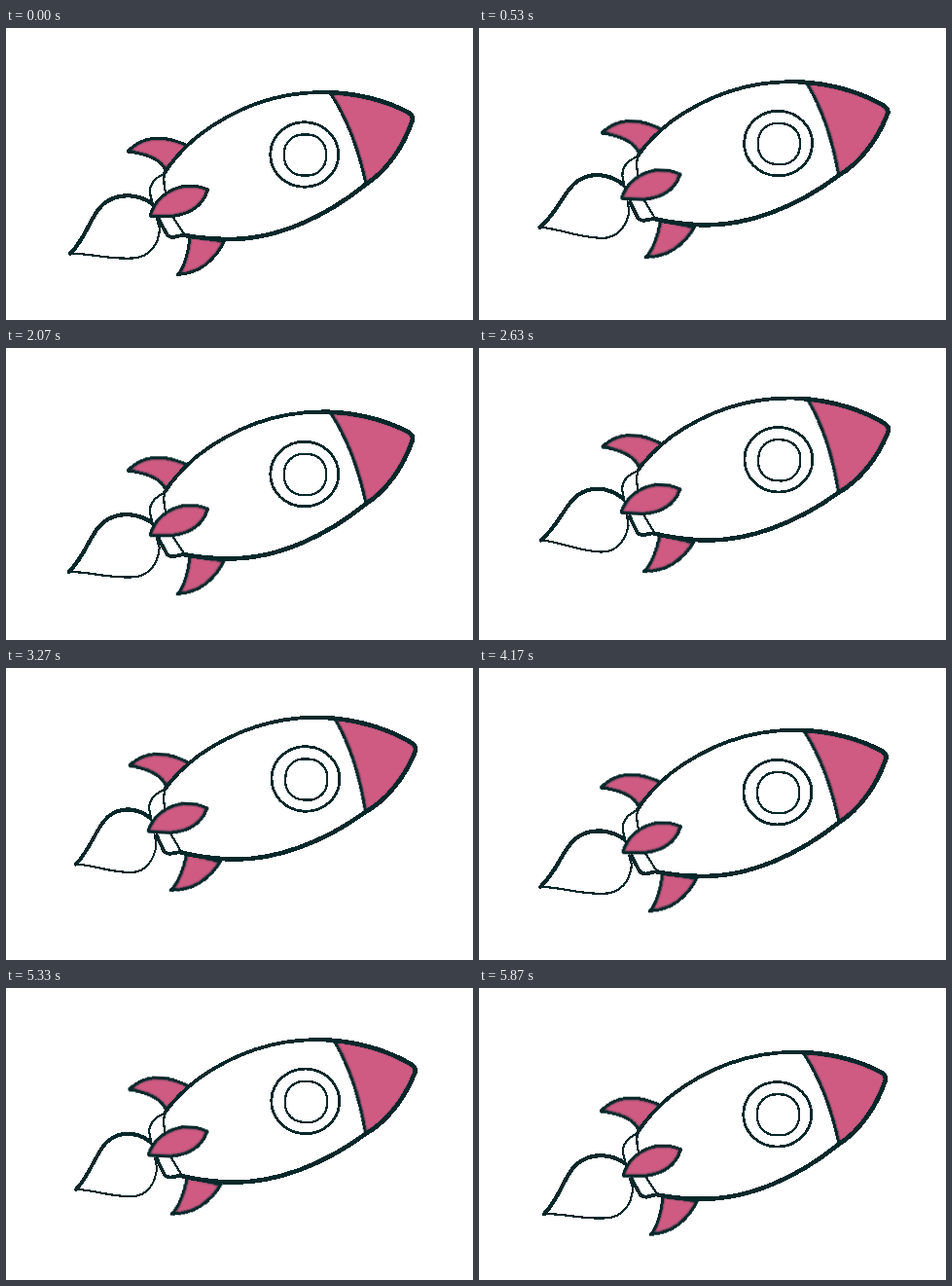
An HTML page that plays this animation: 480x300 px, repeating every 5.93 s.

```html
<!DOCTYPE html>
<html lang="en">
<head>
<meta charset="utf-8">
<title>Rocket</title>
<style>
  html, body { margin: 0; width: 100%; height: 100%; overflow: hidden; background: #fff; }
  svg { display: block; width: 100vw; height: 100vh; shape-rendering: crispEdges; }
  path, ellipse, rect { fill: none; stroke: #06282b; stroke-width: 2.8; stroke-linecap: round; stroke-linejoin: round; }
  .white { fill: #fff; }
  .pink { fill: #cf5b83; stroke-width: 3; filter: url(#shade); }
  .thin { stroke-width: 2.2; }
  .bold { stroke-width: 4.6; }
  .bare { stroke: none; }
</style>
</head>
<body>
<svg viewBox="0 0 480 300">
  <!-- lets the outline bleed softly into the fill -->
  <filter id="shade" color-interpolation-filters="sRGB">
    <feGaussianBlur in="SourceGraphic" stdDeviation="1.2" result="soft"/>
    <feBlend in="soft" in2="SourceGraphic" mode="darken"/>
    <feComposite operator="in" in2="SourceAlpha"/>
  </filter>
  <g id="rocket">
    <g id="flame">
      <path class="thin" d="M66 232C85 231 105 238 130 236.500C148 236 157 222 158 206L155 196"/>
      <path d="M151 181C139 172 117 167 100 181C87 192 83 215 66 232" style="stroke-width:4.2"/>
    </g>
    <path class="white thin" d="M162 150Q147 157 148 170L151 182L166 213Q168 215 172 215L185 212Z"/>
    <path d="M157 197L166 213Q168 215 172 215L185 212" style="stroke-width:3.8"/>
    <path class="pink" d="M125 127C138 112 160 108 187 121L164 146C160 136 145 129 125 127Z"/>
    <path id="fin" class="pink" d="M189 214L224.500 219C214 240 198 252 176.500 253.500C183 246 188 230 189 214Z"/>

    <!-- hull -->
    <path class="white bare" d="M163 149C171 136 182 124 196 112C232 84 275 66 325 66C360 66 392 75 414 87Q420 91 417 97C408 123 391 147 370 160.500C330 193 280 217 230 217Q205 217 184 213L172 195L165 172Q161 160 163 149Z"/>
    <path class="pink" d="M333 66.500C362 67 392 75 414 87Q420 91 417 97C408 123 391 147 370 160.500Q358 104 333 66.500Z"/>
    <path class="thin" d="M163 149Q161 160 165 172L172 195L184 213"/>
    <path d="M163 149C171 136 182 124 196 112C232 84 275 66 325 66" style="stroke-width:3.8"/>
    <path class="bold" d="M325 66C360 66 392 75 414 87Q420 91 417 97C408 123 391 147 370 160.500C330 193 280 217 230 217Q205 217 184 213"/>

    <ellipse cx="306.700" cy="130" rx="35" ry="33.300"/>
    <rect x="286" y="109.500" width="43" height="42" rx="19" style="stroke-width:2.3"/>
    <path class="pink" d="M148 193C155 169 182 155 207.500 166C201 188 179 197 148 193Z"/>
  </g>
</svg>
<script>
const LOOP = 5930, BOBS = 3, DEG = 180 / Math.PI;
const [rocket, flame, fin] = ['rocket', 'flame', 'fin'].map(id => document.getElementById(id));
const start = performance.now();

function draw(now) {
  const angle = Math.max(0, now - start) % LOOP / LOOP * BOBS * 2 * Math.PI;
  const lift = (1 - Math.cos(angle)) / 2;   // 0 low, 1 high
  const speed = Math.sin(angle);

  rocket.setAttribute('transform',
    `translate(${1.6 * lift} ${-20.5 * lift}) rotate(${4.3 * lift} 307 130)`);
  fin.setAttribute('transform', `rotate(${3.2 * lift} 205 217)`);

  // The flame shortens near the top and trails the movement
  const sway = (0.048 * lift + 0.037 * speed) * DEG;
  const stretch = 1 - 0.11 * lift + 0.035 * speed;
  flame.setAttribute('transform',
    `translate(155 185) rotate(${sway}) scale(${stretch} 1) translate(-155 -185)`);
  requestAnimationFrame(draw);
}
draw(start);
</script>
</body>
</html>
```
